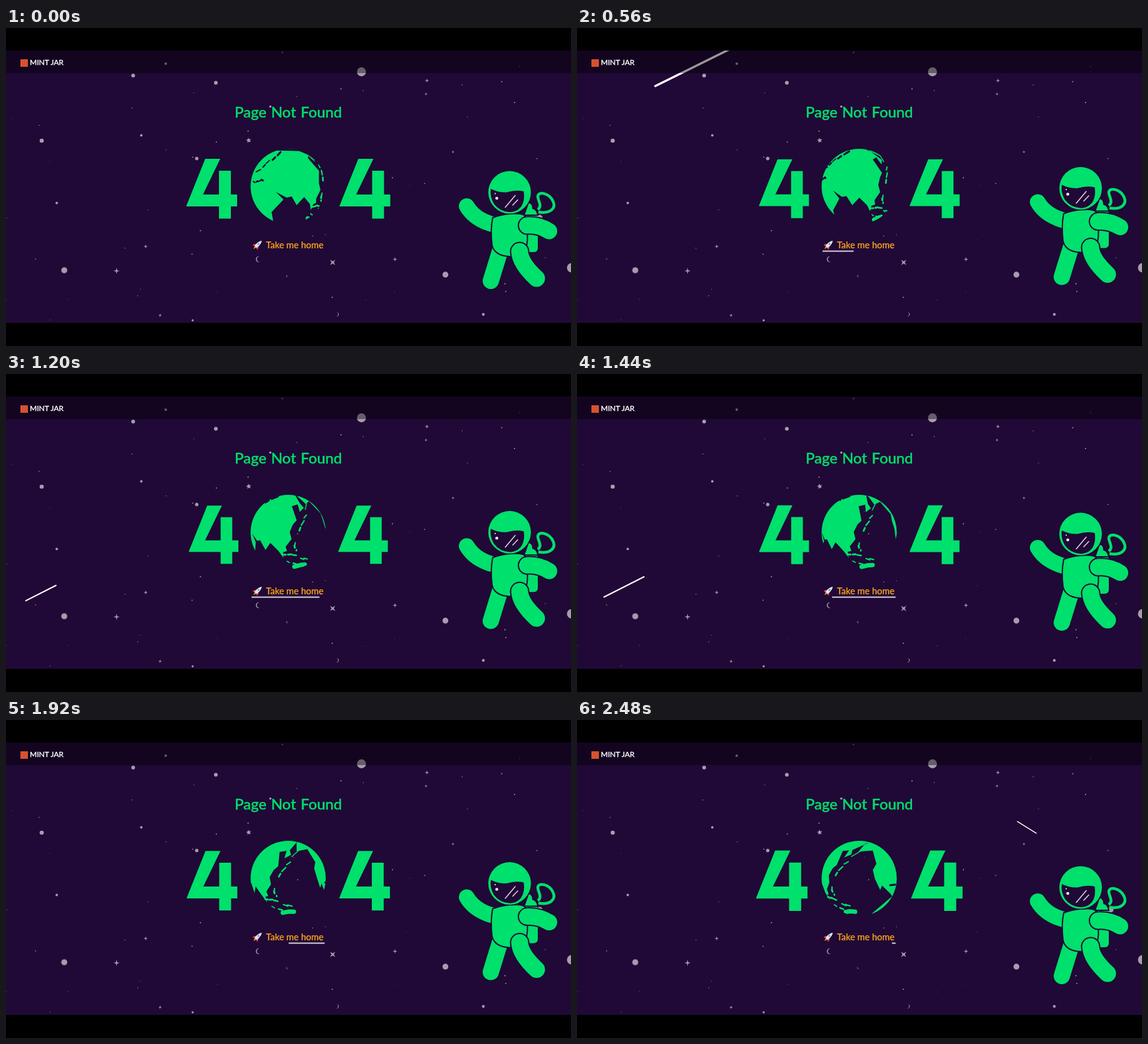
An HTML page for the animation above (2.56 s loop, 902 by 508 pixels).

```html
<!DOCTYPE html>
<html lang="en">
<head>
<meta charset="utf-8">
<title>Page Not Found</title>
<style>
html, body { margin: 0; width: 100%; height: 100%; overflow: hidden; background: #000; }
svg { display: block; width: 100vw; height: 100vh; }
text { font-family: Lato, "Open Sans", sans-serif; font-weight: 500; }
.land { fill: #00e06c; }
.edge { stroke: #200936; stroke-width: 2; }
</style>
</head>
<body>
<svg viewBox="0 0 902 508" xmlns="http://www.w3.org/2000/svg">
  <defs>
    <clipPath id="page"><rect y="36" width="902" height="435"/></clipPath>
    <mask id="map" maskUnits="userSpaceOnUse" x="380" y="183" width="141" height="141">
      <rect x="380" y="183" width="141" height="141" fill="#fff"/>
      <path id="sea"/>
      <g id="bits" fill="none" stroke-linecap="round"></g>
    </mask>
  </defs>
  <rect width="902" height="508"/>
  <g clip-path="url(#page)">
    <rect y="36" width="902" height="435" fill="#200936"/>
    <g id="stars" fill="#fff" opacity=".6"></g>
    <g id="meteors" stroke="#fff" stroke-linecap="round"></g>
    <rect y="36" width="902" height="36" opacity=".4"/>
  </g>

  <rect x="23" y="50" width="12" height="12" fill="#d8512f"/>
  <text x="38" y="59" font-size="12" fill="#fff" stroke="#fff" stroke-width=".3">MINT JAR</text>
  <text x="365" y="143" font-size="23.800" class="land" stroke="#00e06c" stroke-width=".4" word-spacing="1.5">Page Not Found</text>

  <g id="digits" class="land">
    <path id="four" d="M318 209H342L314.500 266H340V228H359V266H369V285H359V304.500H340V285H288V284Z"/>
    <use href="#four" x="244.500"/>
  </g>
  <circle cx="450.500" cy="253" r="60" class="land" mask="url(#map)"/>

  <g transform="translate(402 346) rotate(45)">
    <path d="M-2 4L0 10L2 4Z" fill="#f6a623"/>
    <path d="M-2 0L-5 4V7L-1 5H1L5 7V4L2 0Z" fill="#d8324a"/>
    <path d="M0 -9Q3.500 -5 2.700 5H-2.700Q-3.500 -5 0 -9Z" fill="#dfe3ea"/>
    <circle cy="-1.500" r="1.400" fill="#5b8fc4"/>
  </g>
  <text x="415" y="351.500" font-size="14.500" fill="#ffa31a" stroke="#ffa31a" stroke-width=".2">Take me home</text>
  <rect id="rule" y="355.500" height="2" fill="#d9d2df"/>

  <g id="astronaut" class="land">
    <path d="M850 294C869 297 879 288 873 276C867 264 850 260 849 269C849 276 857 284 849 290" fill="none" stroke="#00e06c" stroke-width="4.500"/>
    <rect x="826" y="297" width="23" height="61" rx="6"/>
    <path class="edge" d="M827 299L834 279Q841 279 841 288Q848 290 849 299Z"/>
    <g id="back"></g>
    <path class="edge" d="M777 303Q790 298 804 297Q826 295 829 301Q835 330 831 349Q826 363 804 365Q780 364 776 347Q773 322 777 303Z"/>
    <g id="front"></g>
    <circle cx="804" cy="262.500" r="35" fill="#200936"/>
    <circle cx="804" cy="262.500" r="34"/>
    <path fill="#200936" d="M774 257Q786 263 799 262.500Q814 258 826.500 261Q829 276 822 286Q814 295 803 294Q788 293 779 281Q772 269 774 257Z"/>
    <g fill="#fff" stroke="#f1dff0" stroke-width="1.400" stroke-linecap="round">
      <circle cx="783.500" cy="272" r="2.300" stroke="none"/>
      <circle cx="781" cy="264.500" r="1" stroke="none"/>
      <path d="M797 286.500L813 267.500M809 283L817 274.500"/>
    </g>
  </g>
</svg>
<script>
const $ = id => document.getElementById(id);
const LOOP = 2560, STEP = 80, RAD = Math.PI / 180;
const clamp = v => Math.max(0, Math.min(1, v));
const set = (el, attrs) => { for (const k in attrs) el.setAttribute(k, attrs[k]); };
const add = (parent, tag, attrs) => {
  const el = document.createElementNS("http://www.w3.org/2000/svg", tag);
  set(el, attrs);
  return $(parent).appendChild(el);
};
let seed = 7;
const rnd = (lo = 0, hi = 1) => {
  seed = (seed * 16807) % 2147483647;
  return lo + (hi - lo) * seed / 2147483647;
};

// ---- limbs: round-ended strokes with a dark rim
function limb(parent, d, width) {
  const shape = { d, fill: "none", "stroke-linecap": "round" };
  add(parent, "path", { ...shape, stroke: "#200936", "stroke-width": width + 4 });
  add(parent, "path", { ...shape, stroke: "#00e06c", "stroke-width": width });
}
limb("back", "M735.5 284.5Q748 306 778 314", 25);
limb("back", "M790 352L774 404", 26);
limb("front", "M820 357Q821 376 847 400", 27);
limb("front", "M832 315.500Q850 314 867 324.500", 26);

// ---- sky
const dot = (cx, cy, r) => add("stars", "circle", { cx, cy, r });
function spark(x, y, r, n, turn = 0) {
  const inner = n > 5 ? .75 : n > 4 ? .45 : .3;
  const pts = Array.from({ length: n * 2 }, (_, i) => {
    const a = (turn - 90 + i * 180 / n) * RAD, d = i % 2 ? r * inner : r;
    return [x + d * Math.cos(a), y + d * Math.sin(a)];
  });
  add("stars", "polygon", { points: pts.join(" ") });
}
const moon = (x, y, r, flip = 1) => add("stars", "path", {
  d: "M.5-1A1 1 0 1 0 .7 .9A.95 .95 0 0 1 .5-1Z",
  transform: `translate(${x} ${y}) scale(${flip * r} ${r})`
});

dot(567.5, 70, 7.2); dot(903, 383, 7.5); dot(701.5, 394, 4.7); dot(57, 180, 3.3);
dot(203, 76, 3); dot(335, 87.5, 3); dot(762, 457.5, 2.2); dot(216, 171.5, 2);
dot(81, 279.5, 2); dot(255, 57, 2); dot(422, 125.5, 1.8); dot(298, 467, 1.7);
spark(93, 387, 5.5, 14); spark(852, 303, 5.2, 14); spark(304.5, 208.5, 3.2, 8);
spark(387.5, 179.5, 4.4, 5, -10); spark(521.5, 374.5, 6, 4, 45); spark(176.5, 388, 5, 4);
spark(621, 369.5, 3.8, 4); spark(223, 349, 3.5, 4); spark(672, 84, 3.5, 4);
spark(246, 459, 3, 4, 15); spark(670.5, 105.5, 2.7, 4); spark(713.5, 198, 2.6, 4);
moon(402, 369.5, 4.6); moon(529, 457.5, 3.2, -1); moon(448.8, 396, 2);
for (let i = 0; i < 50; i++) dot(rnd(0, 902), rnd(38, 468), rnd(.4, 1));

// ---- meteors: a line grows from its start, then its tail catches up
const meteors = [
  { at: 60, x: 76, y: 117, dx: 226, dy: -112, w: 3.5 },
  { at: 1000, x: 30, y: 363, dx: 85, dy: -43, w: 2.2 },
  { at: 2130, x: 699.5, y: 160, dx: 41, dy: 25.5, w: 1.5 }
];
for (const m of meteors) m.el = add("meteors", "line", { "stroke-width": m.w });

function drawMeteor({ el, at, x, y, dx, dy }, t) {
  const p = (t - at) / 900;
  const on = p > 0 && p < 1;
  set(el, { visibility: on ? "visible" : "hidden" });
  if (!on) return;
  const tail = p ** 2.6, head = 1 - (1 - p) ** 3.5;
  set(el, { x1: x + dx * tail, y1: y + dy * tail, x2: x + dx * head, y2: y + dy * head });
}

// ---- globe: points are noted as seen at a given time, then kept as lon / lat
const CX = 450.5, CY = 253, R = 60, SPIN = .045 * RAD;
const ST = Math.sin(10 * RAD), CT = Math.cos(10 * RAD);

const seen = (time, pts) => pts.split(" ").map(p => {
  const [px, py] = p.split(",").map(Number);
  const x = (px - CX) / R, y = (CY - py) / R;
  const z = Math.sqrt(Math.max(0, 1 - x * x - y * y));
  const s = Math.max(-1, Math.min(1, y * CT + z * ST));
  return [Math.atan2(x, z * CT - y * ST) + SPIN * time, Math.asin(s)];
});

function project([lon, lat], t) {
  const a = lon - SPIN * t, c = Math.cos(lat), s = Math.sin(lat);
  let x = c * Math.sin(a), y = s * CT - c * Math.cos(a) * ST;
  const z = s * ST + c * Math.cos(a) * CT;
  if (z < 0) { // far side: push beyond the rim
    const k = (1 - 1.6 * z) / (Math.hypot(x, y) || 1);
    x *= k; y *= k;
  }
  return (CX + x * R).toFixed(2) + " " + (CY - y * R).toFixed(2);
}
const trace = (pts, t) => "M" + pts.map(p => project(p, t)).join("L");

// one ocean: south coast, east coast, far shore, then the south pole
const ocean = [
  ...seen(0, "423,309 424,294 443,274 431,262 448,271 456,269 464,283 476,270"),
  ...seen(560, "463,283 468,293 470,284 476,282 475,275 484,262 481,251"),
  ...seen(1760, "434,240 441,234 441,211 452,209 450,221 460,215 457,208 470,194"),
  ...seen(2080, "463,197 460,210 479,207 490,228 487,238 491,252"),
  ...seen(2400, "487,271 490,264 502,277 506,281"),
  [2, -88 * RAD]
];

const bits = [];
const stroke = (color, width, pts) =>
  bits.push({ pts, el: add("bits", "path", { stroke: color, "stroke-width": width }) });

// a chain of n short pieces strewn along the line from a to b
function chain(color, time, n, width, [ax, ay], [bx, by]) {
  for (let i = 0; i < n; i++) {
    const at = k => {
      const u = (i + k) / n;
      return `${ax + (bx - ax) * u + rnd(-1.5, 1.5)},${ay + (by - ay) * u + rnd(-1.5, 1.5)}`;
    };
    stroke(color, width * rnd(.7, 1.3), seen(time, at(.1) + " " + at(.75)));
  }
}
chain("#fff", 960, 3, 2.4, [486, 222], [478, 253]);
chain("#fff", 960, 3, 2.4, [471, 267], [474, 284]);
chain("#fff", 960, 3, 3, [451, 288], [474, 290]);
chain("#fff", 960, 2, 2, [456, 299], [472, 302]);
chain("#fff", 960, 2, 3, [477, 293], [490, 296]);
chain("#fff", 2160, 1, 2, [446, 218], [467, 208]);
stroke("#fff", 7, seen(1760, "446,308 456,306 464,306"));
chain("#000", 0, 4, 2.6, [394, 246], [412, 243]);
chain("#000", 0, 5, 2.4, [400, 231], [440, 197]);
stroke("#000", 3, seen(2480, "500,264 508,263"));

// ---- one picture for one moment
function draw(t) {
  const turn = 1022;
  const lift = .0115 * (Math.abs(t - turn) - turn);
  set($("astronaut"), { transform: `translate(0 ${lift})` });
  set($("digits"), {
    transform: `translate(450.8 256.8) scale(${1 + .0025 * lift}) translate(-450.8 -256.8)`
  });

  const head = clamp((t - 20) / 1270), tail = clamp((t - 1275) / 1270);
  set($("rule"), { x: 392 + 116.7 * tail, width: 116.7 * (head - tail) });

  set($("sea"), { d: trace(ocean, t) + "Z" });
  for (const b of bits) set(b.el, { d: trace(b.pts, t) });
  for (const m of meteors) drawMeteor(m, t);
}

let start = null;
function tick(now) {
  if (start === null) start = now;
  const t = Math.max(0, now - start) % LOOP;
  draw(Math.floor(t / STEP) * STEP);
  requestAnimationFrame(tick);
}
draw(0);
requestAnimationFrame(tick);
</script>
</body>
</html>
```
